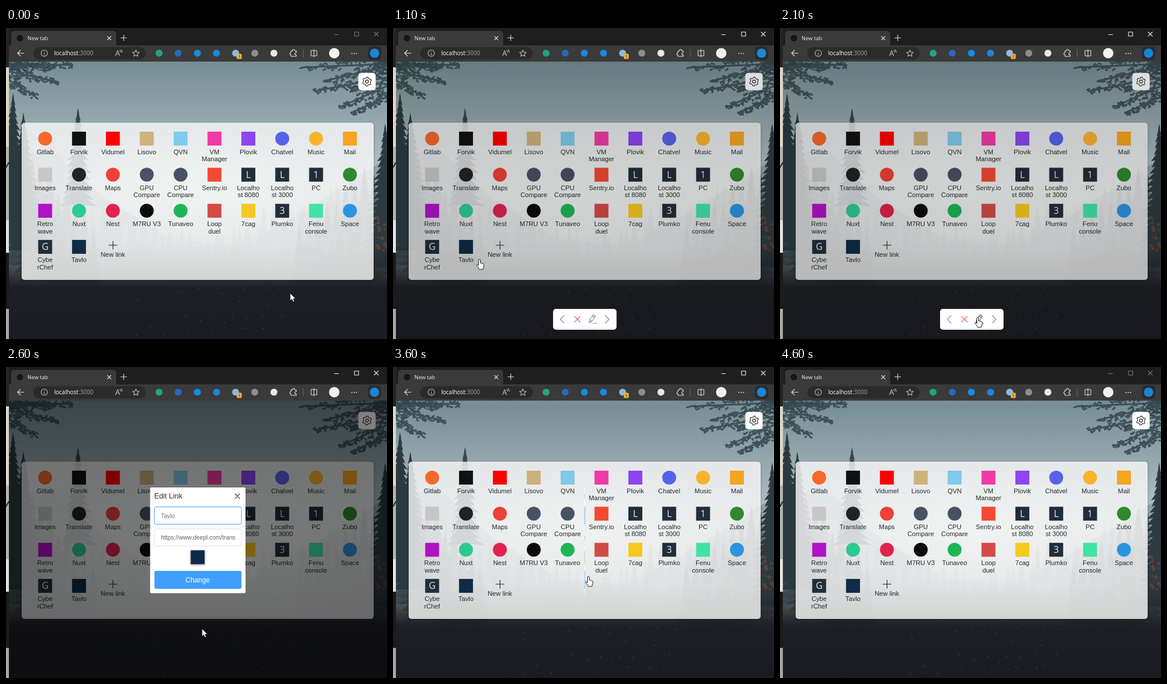
An HTML page that plays this animation: 657 px wide and 537 px high, repeating every 4700 ms.

```html
<!DOCTYPE html>
<html lang="en">
<head>
<meta charset="utf-8">
<title>New tab page</title>
<style>
html, body { margin: 0; width: 100%; height: 100%; overflow: hidden; background: #1c1d21; }
svg { display: block; width: 657px; height: 537px; }
text { font-family: "Liberation Sans", Arial, sans-serif; white-space: pre; }
.ui text, #status { font-family: "Open Sans", "Noto Sans", sans-serif; }
.line { fill: none; stroke-width: 1.1; stroke-linecap: round; stroke-linejoin: round; }
</style>
</head>
<body>
<svg viewBox="0 0 657 537">
  <defs>
    <linearGradient id="sky" x2="0" y2="1">
      <stop offset="0" stop-color="#768d94"/>
      <stop offset=".2" stop-color="#93a6ac"/>
      <stop offset=".45" stop-color="#bcc8cb"/>
      <stop offset=".62" stop-color="#a4afb2"/>
      <stop offset=".8" stop-color="#5c6669"/>
    </linearGradient>
    <radialGradient id="mist">
      <stop stop-color="#e8eff1" stop-opacity=".7"/>
      <stop offset="1" stop-color="#e8eff1" stop-opacity="0"/>
    </radialGradient>
    <linearGradient id="ground" x2="0" y2="1">
      <stop offset="0" stop-color="#1e2024" stop-opacity="0"/>
      <stop offset=".45" stop-color="#1e1f24"/>
      <stop offset="1" stop-color="#1b1c21"/>
    </linearGradient>
    <clipPath id="pageClip"><rect x="5" y="58" width="652" height="479"/></clipPath>
    <clipPath id="fieldClip"><rect x="266" y="282" width="129" height="26"/></clipPath>
    <filter id="shadow" x="-20%" y="-20%" width="140%" height="150%">
      <feDropShadow dx="0" dy="1" stdDeviation="2" flood-opacity=".4"/>
    </filter>
  </defs>

  <!-- desktop edge behind the window -->
  <g id="edge"></g>

  <g clip-path="url(#pageClip)">
    <g id="photo"></g>
    <rect x="27" y="163.5" width="607" height="271.5" rx="5" fill="#fff" fill-opacity=".76" filter="url(#shadow)"/>
    <g id="links"></g>
    <rect x="607.5" y="77.5" width="30" height="30" rx="5" fill="#fff"/>
    <g id="gear" class="line" stroke="#222" transform="translate(622.5 92.5)"></g>
    <text id="status" x="8" y="534.5" font-size="8.6" fill="#85878a">https://www.deepl.com/translator</text>

    <rect id="dim" x="5" y="58" width="652" height="479"/>
    <g id="tools">
      <rect x="276" y="485" width="109.5" height="36" rx="5" fill="#fff"/>
      <g class="line" stroke="#8c8c8c">
        <path d="M295 496.500l-6.500 6.500 6.500 6.500M366 496.500l6.500 6.500-6.500 6.500"/>
        <path d="M313 498l10 10m0-10l-10 10" stroke="#e0626c"/>
        <path id="pencil" d="M338 509l1-5 6-9 4 2.800-6 9zM339 504l4 2.800M343.500 497.500l4 2.800M345 510h6"/>
      </g>
    </g>

    <rect id="veil" x="5" y="58" width="652" height="479"/>
    <g id="dialog">
      <rect x="248.500" y="208" width="164.500" height="182.500" rx="2.500" fill="#fff"/>
      <text x="255.500" y="227" font-size="12.700" fill="#303133">Edit Link</text>
      <path class="line" stroke="#333" d="M395 219l8 8m0-8l-8 8"/>
      <rect x="256" y="241.500" width="150" height="30" rx="3" fill="#fff" stroke="#409eff"/>
      <text x="267" y="260.500" font-size="10.300" fill="#73767a">Tavlo</text>
      <path id="caret" d="M267.500 250v13" stroke="#333"/>
      <rect x="256" y="279.500" width="150" height="29.500" rx="3" fill="#fff" stroke="#dcdfe6"/>
      <text x="267" y="298" font-size="10.300" fill="#606266" clip-path="url(#fieldClip)">https://www.deepl.com/translator</text>
      <rect x="318.500" y="316.500" width="24" height="24" fill="#0f2b46" filter="url(#shadow)"/>
      <rect id="change" x="256" y="352" width="150" height="31" rx="3"/>
      <text x="330.500" y="371.500" font-size="12" fill="#fff" text-anchor="middle">Change</text>
    </g>
  </g>

  <g class="ui">
    <rect x="5" width="652" height="31" fill="#1e1e1e"/>
    <path d="M5 58V30h4V11q0-6 6-6h169q6 0 6 6v19h467v28z" fill="#3a3a3a"/>
    <circle cx="24" cy="17.500" r="5.500" fill="#151515"/>
    <text x="37" y="20.700" font-size="9.200" fill="#eee">New tab</text>
    <path class="line" stroke="#ddd" d="M175 14.500l6 6m0-6l-6 6M198 17h10M203 12v10"/>
    <path id="controls" class="line" d="M566.500 11.500h7M601 7h7v7h-7zM635 7l7 7m0-7l-7 7"/>
    <path class="line" stroke="#ddd" d="M31 43.500H20m5-5l-5 5 5 5"/>
    <rect x="47" y="33" width="194" height="21.500" rx="10.700" fill="#2b2b2b"/>
    <g class="line" stroke="#bbb">
      <circle cx="66" cy="43.500" r="5.500"/><path d="M66 43v3.500M66 40.500v.2"/>
      <path d="M189 48l3.500-9 3.500 9m-5.500-3h4M196 39q2 1 2 3M198.500 37.500q2 2 2 4.500"/>
      <path id="star"/>
      <path d="M491.500 39.500h2.500q0-2.500 2-2.500t2 2.500h2.500v3q-2.500 0-2.500 2t2.500 2v2.500h-9v-2.500q-2 0-2-2t2-2z" stroke="#ddd"/>
      <path d="M512.500 37v13" stroke="#666"/>
      <path d="M530 39h-4v9h4M532 39h4v9h-4M531 37v13" stroke="#ddd"/>
    </g>
    <text x="83" y="47" font-size="10" fill="#fff">localhost<tspan fill="#a5a5a5">:3000</tspan></text>
    <g id="extensions"></g>
    <rect x="398" y="44.500" width="8.500" height="9" rx="1.500" fill="#e8b23c"/>
    <text x="400" y="52" font-size="7.500" fill="#222">1</text>
    <circle cx="566" cy="43.500" r="9" fill="#f1f2ee"/>
    <g fill="#ddd"><circle cx="596.500" cy="44" r="1"/><circle cx="600.500" cy="44" r="1"/><circle cx="604.500" cy="44" r="1"/></g>
    <rect x="624" y="32" width="23" height="23" rx="6" fill="#292c31"/>
    <circle cx="635.500" cy="43.500" r="8" fill="#1a85d6"/>
  </g>

  <g id="cursor" stroke-linejoin="round">
    <path id="arrow" d="M0 0v13l3-2.800 2 4.600 2.200-1-2-4.500h4.200z" fill="#fff" stroke="#222" stroke-width=".8"/>
    <path id="hand" d="M-1.500 1a1.500 1.500 0 013 0v5l1-.3 1.200.6 1-.1 1.200.8 1.200.3.6 1.500v3l-1.500 3.500v1.500h-6.500l-1-2.500-3.500-4.500c-.5-1.200.8-2 1.800-1l1.500 1.500z" fill="#fff" stroke="#222"/>
  </g>
</svg>

<script>
const $ = id => document.getElementById(id);
const LOOP = 4700, STEP = 100;

let seed = 7;
const rnd = () => (seed = seed * 16807 % 2147483647) / 2147483647;
const between = (a, b) => a + rnd() * (b - a);

const rect = (x, y, w, h, fill) => `<rect x="${x}" y="${y}" width="${w}" height="${h}" fill="${fill}"/>`;
const disc = (x, y, r, fill) => `<circle cx="${x}" cy="${y}" r="${r}" fill="${fill}"/>`;
const ring = (n, radius) => 'M' + Array.from({ length: n }, (_, i) => {
  const a = i / n * Math.PI * 2 - Math.PI / 2, r = radius(i);
  return (r * Math.cos(a)).toFixed(1) + ' ' + (r * Math.sin(a)).toFixed(1);
}).join('L') + 'z';

// A fir: jagged tiers widening from the tip down.
function fir(x, top, height, color, opacity = 1) {
  const tiers = Math.max(5, Math.round(height / 11));
  const side = dir => Array.from({ length: tiers }, (_, i) => {
    const k = (i + 1) / tiers, w = height * .2 * k * between(.75, 1.1);
    const y = top + height * k;
    return [[x + dir * w, y], [x + dir * w * .5, y - 2]];
  }).flat();
  const points = [[x, top], ...side(1), ...side(-1).reverse()];
  return `<polygon points="${points.map(p => p.map(v => v.toFixed(1))).join(' ')}" fill="${color}" opacity="${opacity}"/>`;
}

// A bough: a stem wrapped in short needles, thinning towards its end.
function bough(x, y, dx, dy) {
  let d = `M${x} ${y}l${dx} ${dy}`;
  for (let i = 0; i < 70; i++) {
    const k = (i / 70) ** 1.3, w = 15 * (1 - k * .6);
    const px = x + dx * k + between(-w, w) * .7, py = y + dy * k + between(-w, w) * .7;
    d += `M${px.toFixed(1)} ${py.toFixed(1)}l${between(-5, 5).toFixed(1)} ${between(0, 3).toFixed(1)}`;
  }
  return `<path class="line" d="${d}" stroke="#33464d" style="stroke-width:3" opacity=".85"/>`;
}

function drawPhoto() {
  let s = rect(5, 58, 652, 479, 'url(#sky)');
  s += '<ellipse cx="340" cy="285" rx="260" ry="120" fill="url(#mist)"/>';
  s += '<path d="M5 230l70-25 90 85 120 75 120 10 110-60 142-90v322H5z" fill="#738489" opacity=".5"/>';
  for (let i = 0; i < 34; i++) {
    const x = 140 + i * 14 + between(-5, 5), rise = Math.abs(x - 330) * .3;
    s += fir(x, 355 - rise + between(-15, 20), between(70, 110), '#64757a', .45);
  }
  for (let i = 0; i < 10; i++) s += fir(15 + i * 15, 200 + i * 14 + between(-20, 20), 200, '#3a4a4f', .6);
  for (let i = 0; i < 10; i++) s += fir(650 - i * 16, 225 + i * 14 + between(-15, 15), 200, '#39454a', .6);
  s += fir(124, 138, 170, '#34464c') + fir(12, 112, 260, '#2c3a3f') + fir(30, 146, 240, '#2c3a3f') + fir(654, 165, 250, '#2d3a3f');
  for (let i = 0; i < 14; i++)
    s += disc(between(634, 657), between(325, 385), between(1.5, 3.5), '#5d4139');
  s += rect(5, 375, 652, 162, 'url(#ground)');
  for (let i = 0; i < 60; i++)
    s += disc(between(200, 530), between(440, 532), between(.6, 1.8), '#2a2f34');
  for (const [x, y, dx, dy] of [[5, 62, 75, 8], [5, 75, 85, 18], [5, 90, 45, 28], [5, 62, 110, 2]]) s += bough(x, y, dx, dy);
  for (const [x, y, dx, dy] of [[657, 62, -145, 6], [657, 66, -110, 26], [657, 85, -125, 24],
    [657, 100, -80, 36], [657, 118, -60, 28], [657, 60, -60, 50]]) s += bough(x, y, dx, dy);
  return s;
}

// label, colour, shape: o = disc, anything else is a square holding that letter
const LINKS = [
  ['Gitlab', '#f5692c', 'o'], ['Forvik', '#111'], ['Vidumel', '#f00'], ['Lisovo', '#cdb27c'], ['QVN', '#80caeb'],
  ['VM|Manager', '#f13aa6'], ['Plovik', '#8d45f2'], ['Chatvel', '#5663e8', 'o'], ['Music', '#f9b42c', 'o'], ['Mail', '#f6a51f'],
  ['Images', '#c9c6c4'], ['Translate', '#222', 'o'], ['Maps', '#ef4136', 'o'], ['GPU|Compare', '#485264', 'o'], ['CPU|Compare', '#485264', 'o'],
  ['Sentry.io', '#f24a32'], ['Localho|st 8080', '#202d3a', 'L'], ['Localho|st 3000', '#202d3a', 'L'], ['PC', '#202d3a', '1'], ['Zubo', '#2f8a2d', 'o'],
  ['Retro|wave', '#b012c6'], ['Nuxt', '#2dcb90', 'o'], ['Nest', '#e0234e', 'o'], ['M7RU V3', '#0c0c0c', 'o'], ['Tunaveo', '#1eb655', 'o'],
  ['Loop|duel', '#d24b45'], ['7cag', '#f6c91f'], ['Plumko', '#202d3a', '3'], ['Fenu|console', '#42e3a4'], ['Space', '#2c93e0', 'o'],
  ['Cybe|rChef', '#202d3a', 'G'], ['Tavlo', '#0f2b46']
];

const label = (name, x, y) => name.split('|').map((part, i) =>
  `<text x="${x}" y="${y + i * 12.6}" font-size="11.2" text-anchor="middle" fill="#26282a">${part}</text>`).join('');

function drawLink([name, color, shape], i) {
  const x = 67.5 + i % 10 * 58.4, y = 191 + Math.floor(i / 10) * 62.3;
  let s = shape === 'o' ? disc(x, y, 12, color) : rect(x - 12, y - 12, 24, 24, color);
  if (shape && shape !== 'o')
    s += `<text x="${x}" y="${y + 5.5}" font-size="16" fill="#e8edf0" text-anchor="middle" style="font-family:'Open Sans',sans-serif">${shape}</text>`;
  return `<g${i === 31 ? ' id="picked"' : ''}>${s}${label(name, x, y + 26.5)}</g>`;
}

$('photo').innerHTML = drawPhoto();
$('links').innerHTML = LINKS.map(drawLink).join('') + label('New link', 184.3, 394.5) +
  '<path class="line" stroke="#222" d="M177.500 375h14M184.500 368v14"/>';
$('gear').innerHTML = `<path d="${ring(24, i => i % 4 < 2 ? 7.8 : 6)}"/><circle r="2.6"/>`;
$('star').setAttribute('d', ring(10, i => i % 2 ? 2.8 : 6));
$('star').setAttribute('transform', 'translate(224 44)');
$('edge').innerHTML = [[0, '#252525'], [68, '#dcd6c4'], [205, '#b4b4b0'], [332, '#e2e2e0'], [388, '#1b1b1b'], [485, '#a8a8a6']]
  .map(([y, c]) => rect(0, y, 5, 537 - y, c)).join('') + '<path d="M0 241l5-9" stroke="#222" stroke-width="2"/>';
$('extensions').innerHTML = ['#20a582', '#2469bd', '#168be0', '#1c86e0', '#8fb7dc', '#8d8d8d', '#e9e9e4']
  .map((c, i) => disc(264 + i * 33, 43.5, 6, c)).join('');

// time, x, y of the pointer tip
const PATH = [[0, 490, 458], [600, 125, 372], [900, 125, 372], [1100, 149, 400], [1200, 170, 422],
  [1700, 341, 500], [2200, 341, 500], [2400, 340, 487], [2600, 338, 452], [3000, 337, 363],
  [3700, 337, 362], [4300, 490, 545], [LOOP, 490, 545]];

function pointer(t) {
  const i = PATH.findIndex(p => p[0] > t), [t0, x0, y0] = PATH[i - 1], [t1, x1, y1] = PATH[i];
  const k = (t - t0) / (t1 - t0);
  return [x0 + (x1 - x0) * k, y0 + (y1 - y0) * k];
}

const within = (t, a, b) => t >= a && t < b;
const ease = (t, a, b) => {
  const k = Math.min(1, Math.max(0, (t - a) / (b - a)));
  return k * k * (3 - 2 * k);
};
const set = (id, attrs) => { for (const k in attrs) $(id).setAttribute(k, attrs[k]); };

function draw(t) {
  const [x, y] = pointer(t);
  const hand = within(t, 600, 1200) || within(t, 1700, 2300) || within(t, 2900, 3800);
  set('cursor', { transform: `translate(${x} ${y})` });
  set('arrow', { opacity: hand ? 0 : 1 });
  set('hand', { opacity: hand ? 1 : 0 });
  set('controls', { stroke: within(t, 500, 4400) ? '#eee' : '#777' });

  const hovered = within(t, 600, 1000);
  set('picked', { transform: `translate(125.900 378) scale(${hovered ? 1.07 : 1}) translate(-125.900 -378)` });
  set('status', { opacity: hovered ? 1 : 0 });

  const tools = ease(t, 800, 1100) - ease(t, 2100, 2400);
  set('dim', { 'fill-opacity': tools * .13 });
  set('tools', { transform: `translate(0 ${(1 - tools) * 56})` });
  set('pencil', { stroke: within(t, 1700, 2300) ? '#555' : '#8c8c8c' });

  // the dialog unfolds sideways from its middle and folds back the same way
  const open = ease(t, 2100, 2400) - ease(t, 3300, 3615);
  set('veil', { 'fill-opacity': open * .5 });
  set('dialog', { transform: `translate(330.750 0) scale(${open} 1) translate(-330.750 0)` });
  set('caret', { opacity: within(t, 2900, 3400) ? 1 : 0 });
  set('change', { fill: t >= 2900 ? '#79bbff' : '#409eff' });
}

const start = performance.now();
function tick() {
  draw(Math.floor((performance.now() - start) % LOOP / STEP) * STEP);
  requestAnimationFrame(tick);
}
tick();
</script>
</body>
</html>
```
